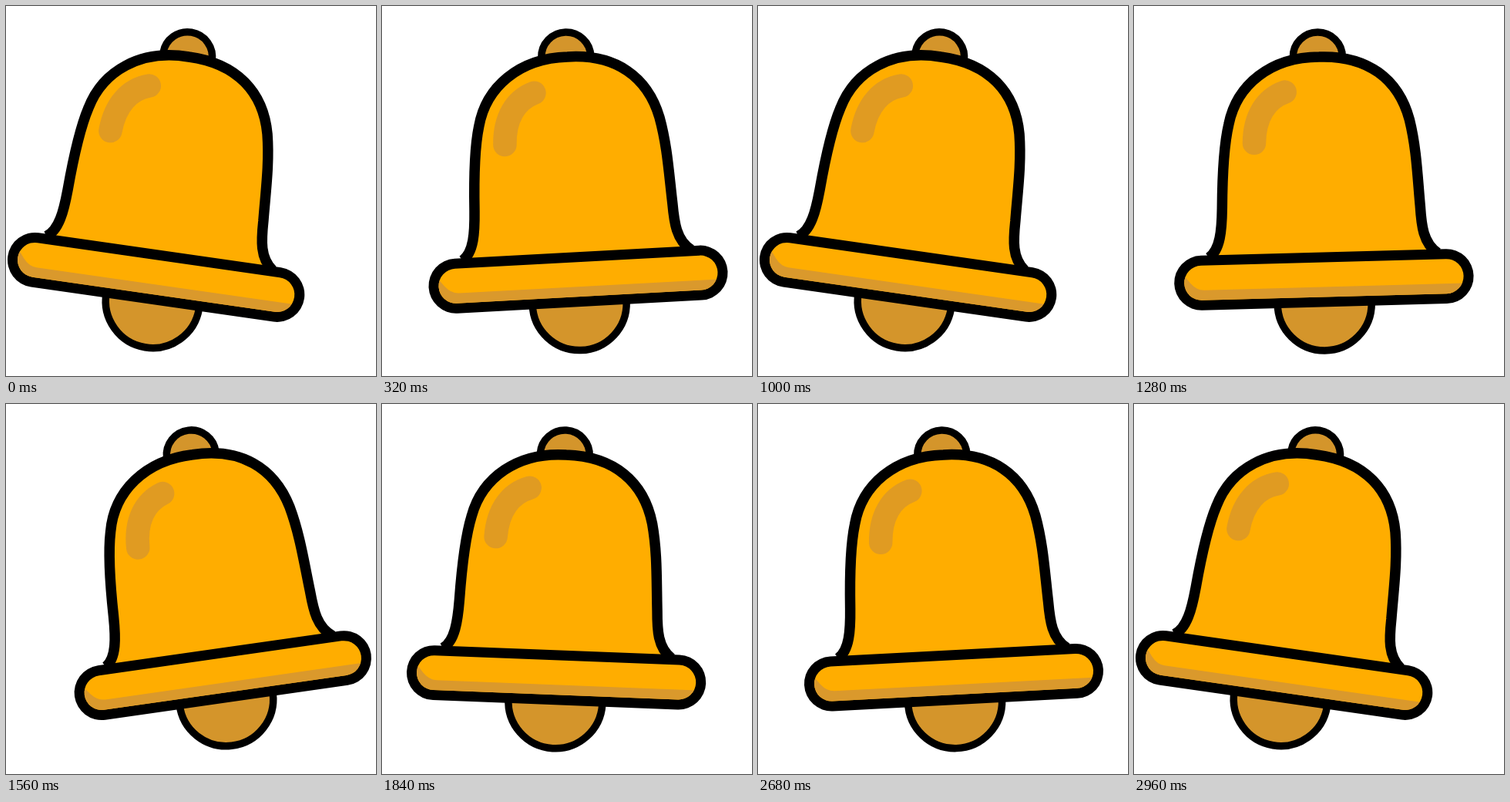
An HTML page for the animation above (3 s loop, 480 by 480 pixels).

```html
<!DOCTYPE html>
<html lang="en">
<head>
<meta charset="utf-8">
<title>Ringing bell</title>
<style>
  html, body { margin: 0; width: 100%; height: 100%; overflow: hidden; background: #fff; }
  svg { display: block; width: 100%; height: 100%; }
</style>
</head>
<body>
<svg viewBox="0 0 480 480">
  <defs>
    <clipPath id="rimShape"><rect x="64" y="332.500" width="362.500" height="45" rx="22.500"/></clipPath>
  </defs>
  <g id="bell" stroke="#000">
    <circle cx="246" cy="386" r="61" fill="#d4952b" stroke-width="9.500"/>
    <circle cx="238.300" cy="66" r="32" fill="#d4952b" stroke-width="9.500"/>
    <path fill="#ffad00" stroke-width="13.500" d="M96 326C111 316 113 290 113.500 262C114 215 116 180 122.500 153
      C133 102 177 66 240 66C303 64 343 95 357 148C366 185 367 220 370.500 260C372 285 374 308 393 321"/>
    <path fill="none" stroke="#e09b22" stroke-width="30.500" stroke-linecap="round" d="M195.500 111.500C171 120 156 143 155.500 177.500"/>
    <g transform="rotate(-1.35 245 355)">
      <rect x="51" y="319.500" width="388.500" height="71" rx="35.500" stroke="none"/>
      <g clip-path="url(#rimShape)" stroke="none">
        <rect x="60" y="330" width="370" height="50" fill="#ffad00"/>
        <path fill="#da992c" d="M60 340L72 355Q80 364.500 90 364.500H430V380H60Z"/>
      </g>
    </g>
  </g>
</svg>
<script>
  const LOOP = 3000, STEP = 40;
  const LEFT = 8.3, RIGHT = -9.6;   // swing limits in degrees
  const DRAWN_TILT = -1.2;          // tilt of the artwork as drawn
  const turns = [0, 510, 1000, 1516, 2000, 2510, 2960];
  const bell = document.getElementById('bell');

  function angleAt(t) {
    const next = turns.findIndex(turn => turn > t);
    if (next < 0) return LEFT;
    const start = turns[next - 1];
    const p = (t - start) / (turns[next] - start);
    const [from, to] = next % 2 ? [LEFT, RIGHT] : [RIGHT, LEFT];
    return from + (to - from) * p;
  }

  function draw(ms) {
    const t = Math.floor((ms % LOOP) / STEP) * STEP;
    bell.setAttribute('transform', `rotate(${angleAt(t) - DRAWN_TILT} 238.5 49)`);
  }

  const begin = performance.now();
  function tick() {
    draw(performance.now() - begin);
    requestAnimationFrame(tick);
  }
  tick();
</script>
</body>
</html>
```
